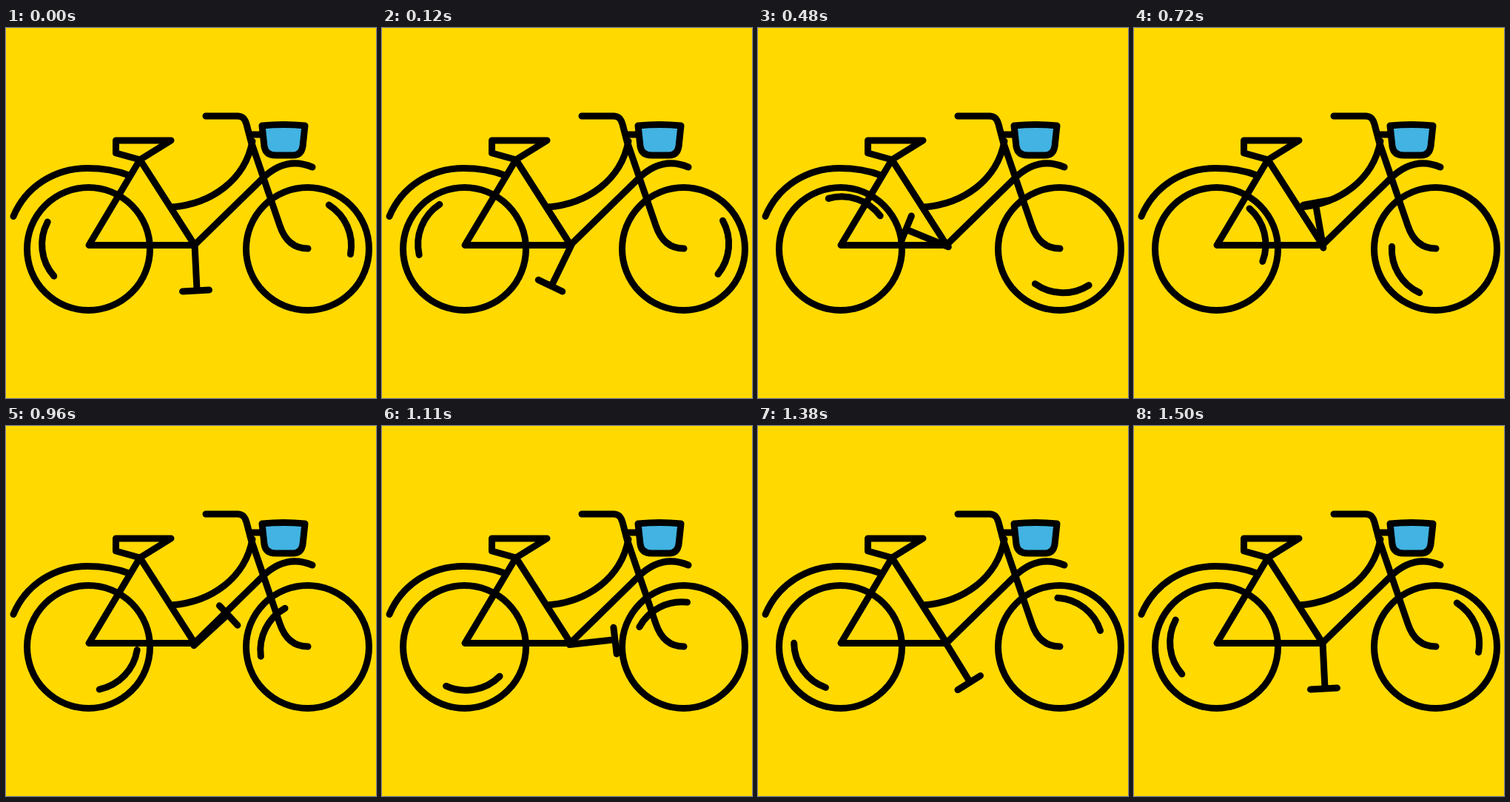
An HTML page for the animation above (1.53 s loop, 500x500 px).

```html
<!DOCTYPE html>
<html lang="en">
<head>
<meta charset="utf-8">
<title>Bicycle</title>
<style>
  html, body { margin: 0; width: 100%; height: 100%; overflow: hidden; background: #ffd900; }
  svg { display: block; width: 100%; height: 100%; }
  svg * { fill: none; stroke: #000; stroke-width: 9; stroke-linecap: round; stroke-linejoin: round; }
  svg .basket { fill: #42b3e2; }
</style>
</head>
<body>
<svg viewBox="0 0 500 500">
  <!-- wheels and rear mudguard -->
  <circle cx="111.5" cy="298.5" r="83"/>
  <circle cx="407.5" cy="298.5" r="83"/>
  <path d="M10 254.5C27 214 66 189.5 110 189.5C130 189.5 149 192.5 166 199"/>

  <!-- frame and saddle -->
  <path d="M181 178L112 293.5H255Z"/>
  <path d="M148.5 152H223L181 178L148.5 169Z"/>
  <path d="M224 242C277 238 323 206 333 153"/>
  <path d="M255 293L346 204C366 184 388 177 414 188"/>

  <!-- handlebar, fork and basket -->
  <path d="M270 119H313C320 119 323 123 325 130L331 153L370 267C376 285 387 298 408 298"/>
  <path d="M332 144H346"/>
  <path class="basket" d="M346 132Q375 129 404 132L401 160Q399 172 388 172H364Q351 172 349 160Z"/>

  <!-- turning parts, each about its own pivot -->
  <path data-pivot="113.3 292.5" d="M56.2 262.1A64.7 64.7 0 0 0 64.8 335.3"/>
  <path data-pivot="407.3 296.8" d="M436.3 239.1A64.7 64.7 0 0 1 465.5 305.7"/>
  <path data-pivot="255.3 295.1" d="M255 293L258 354M238.5 356L274.5 354"/>
</svg>
<script>
  const STEP = 30, STEPS = 51;
  const turning = document.querySelectorAll('[data-pivot]');

  function draw(now) {
    const step = Math.floor(now / STEP) % STEPS;
    const angle = 360 * step / (STEPS - 1);
    for (const part of turning) {
      part.setAttribute('transform', `rotate(${angle} ${part.dataset.pivot})`);
    }
    requestAnimationFrame(() => draw(performance.now()));
  }
  draw(0);
</script>
</body>
</html>
```
